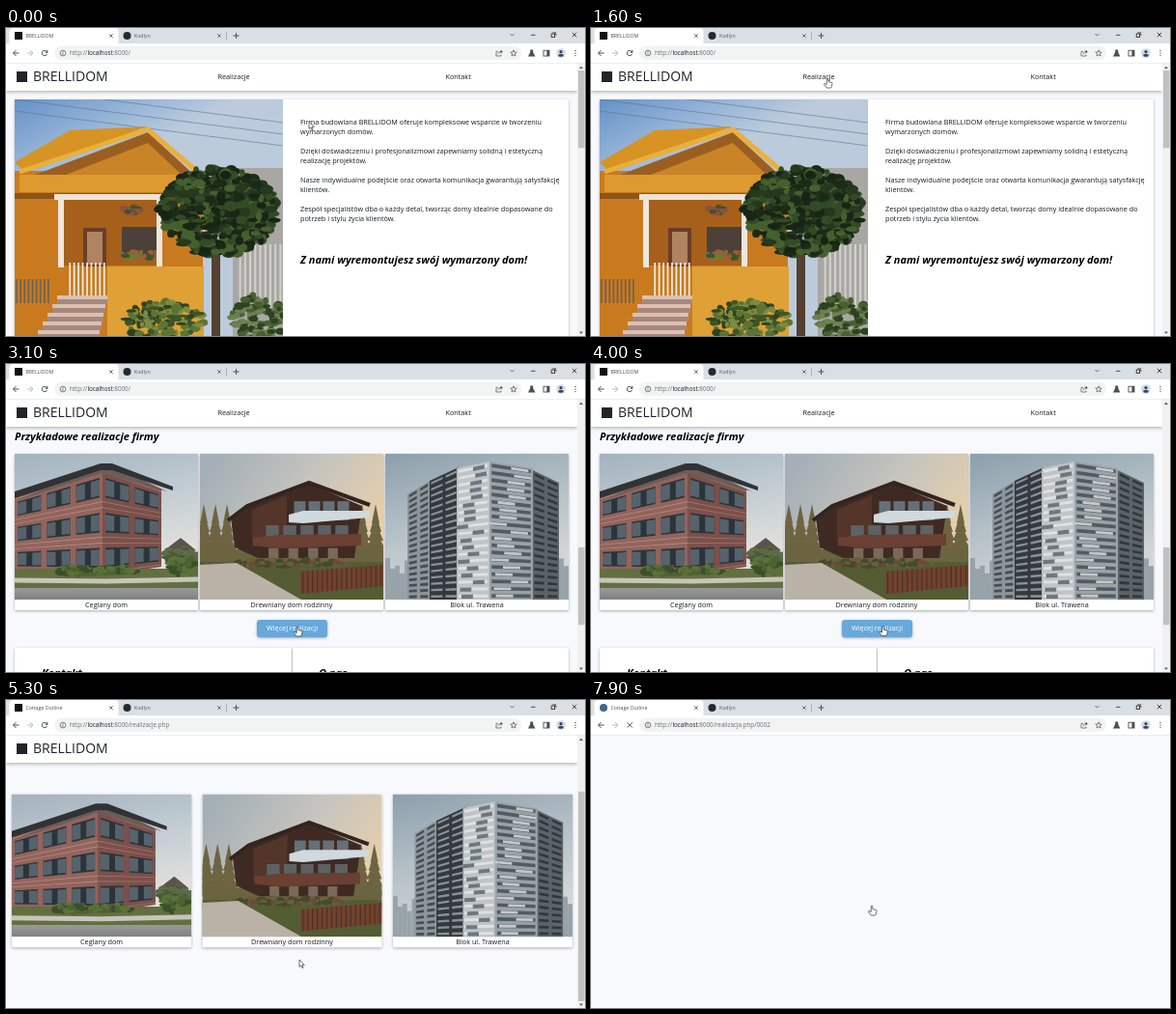
Animation, 600 px wide and 319 px high, one loop 8000 ms. Source, as an HTML page with a canvas:

```html
<!DOCTYPE html>
<html lang="pl">
<head>
<meta charset="utf-8">
<title>BRELLIDOM</title>
<style>
html, body { margin: 0; width: 100%; height: 100%; overflow: hidden; background: #f8f9fc; }
canvas { display: block; width: 600px; height: 319px; }
</style>
</head>
<body>
<canvas id="stage"></canvas>
<script>
const W = 600, H = 319, LOOP = 8000, STEP = 100;
const NAME = 'BRELLIDOM';
const FONT = '"Open Sans", "Noto Sans", sans-serif';
const canvas = document.getElementById('stage');
const c = canvas.getContext('2d');
const dpr = window.devicePixelRatio || 1;
canvas.width = W * dpr;
canvas.height = H * dpr;

const lerp = (a, b, k) => a + (b - a) * k;
const smooth = (a, b, t) => {
  const k = Math.min(1, Math.max(0, (t - a) / (b - a)));
  return k * k * (3 - 2 * k);
};

// ---- drawing helpers ----
function rect(color, x, y, w, h) {
  c.fillStyle = color;
  c.fillRect(x, y, w, h);
}
function trace(p) {
  c.beginPath();
  for (let i = 0; i < p.length; i += 2) c.lineTo(p[i], p[i + 1]);
}
function poly(color, ...p) {
  trace(p);
  c.fillStyle = color;
  c.fill();
}
function line(color, width, ...p) {
  trace(p);
  c.strokeStyle = color;
  c.lineWidth = width;
  c.stroke();
}
function disc(color, x, y, rx, ry = rx) {
  c.fillStyle = color;
  c.beginPath();
  c.ellipse(x, y, rx, ry, 0, 0, 7);
  c.fill();
}
function ring(color, width, x, y, r, a = 0, b = 7) {
  c.strokeStyle = color;
  c.lineWidth = width;
  c.beginPath();
  c.arc(x, y, r, a, b);
  c.stroke();
}
function round(color, x, y, w, h, r) {
  c.fillStyle = color;
  c.beginPath();
  c.roundRect(x, y, w, h, r);
  c.fill();
}
function grad(x0, y0, x1, y1, ...colors) {
  const g = c.createLinearGradient(x0, y0, x1, y1);
  colors.forEach((col, i) => g.addColorStop(i / (colors.length - 1), col));
  return g;
}
function text(s, x, mid, size = 7.25, color = '#17191c', style = '', align = 'left') {
  c.font = `${style} ${size}px ${FONT}`;
  c.fillStyle = color;
  c.textAlign = align;
  c.fillText(s, x, mid + size * 0.34);
}
const title = (s, x, mid) => text(s, x, mid, 11.05, '#000', 'italic bold');
function shadow(alpha, blur, dy) {
  c.shadowColor = `rgba(0,0,0,${alpha})`;
  c.shadowBlur = blur * dpr;
  c.shadowOffsetY = dy * dpr;
}
function card(x, y, w, h, color = '#fff', r = 1) {
  c.save();
  shadow(0.32, 3, 1);
  round(color, x, y, w, h, r);
  c.restore();
}
function clipped(x, y, w, h, draw) {
  c.save();
  c.beginPath();
  c.rect(x, y, w, h);
  c.clip();
  draw();
  c.restore();
}
// Wall in perspective: fills a patch from (u0,v0) to (u1,v1)
function wall(x0, t0, b0, x1, t1, b1) {
  const at = (u, v) => [lerp(x0, x1, u), lerp(lerp(t0, t1, u), lerp(b0, b1, u), v)];
  return (color, u0 = 0, v0 = 0, u1 = 1, v1 = 1) =>
    poly(color, ...at(u0, v0), ...at(u1, v0), ...at(u1, v1), ...at(u0, v1));
}
// Evenly spaced panes; w and h are shares of a cell
function panes(face, cols, rows, w, h, color) {
  for (let i = 0; i < cols; i++)
    for (let j = 0; j < rows; j++)
      face(color, (i + 0.5 - w / 2) / cols, (j + 0.5 - h / 2) / rows,
        (i + 0.5 + w / 2) / cols, (j + 0.5 + h / 2) / rows);
}
function random(seed) {
  return () => (seed = (seed * 16807) % 2147483647) / 2147483647;
}
function leaves(x, y, rx, ry, n, size, ...colors) {
  const r = random(n * 31 + 7);
  for (let i = 0; i < n; i++) {
    const a = r() * 6.283, d = Math.sqrt(r());
    disc(colors[i % colors.length], x + Math.cos(a) * rx * d, y + Math.sin(a) * ry * d,
      size * (0.5 + r()), size * (0.4 + r() * 0.6));
  }
}

// ---- pictures ----
function yellowHouse() {
  rect(grad(9, 74, 60, 170, '#6592c6', '#8fb0d6', '#bccbdc'), 9, 74, 278, 270);
  for (let i = 0; i < 3; i++) line('#5a7494', 0.6, 9, 62 + i * 12, 287, 98 + i * 12);
  rect('#a9a7a3', 235, 145, 52, 200);
  poly('#d79323', 9, 139, 66, 106, 146, 102, 20, 150);
  rect('#c97a1e', 9, 148, 195, 200);
  poly('#9a5f20', 147, 108, 30, 152, 195, 152);
  poly('#c98427', 147, 119, 62, 152, 182, 152);
  line('#eab03c', 5, 14, 149, 147, 105, 202, 152);
  rect('#dd9a2f', 14, 152, 185, 18);
  rect('#8f5319', 9, 171, 190, 6);
  rect('#a6601c', 60, 178, 100, 68);
  rect('#6b3e26', 80, 207, 24, 40);
  rect('#b08460', 84, 211, 16, 34);
  rect('#4b4139', 120, 206, 38, 27);
  leaves(140, 235, 24, 5, 40, 3, '#40532a', '#687b3a', '#a05b37');
  leaves(130, 188, 9, 5, 22, 3, '#40532a', '#8c5140');
  for (const x of [54, 156]) rect('#efe6dc', x, 174, 6, 74);
  rect('#eee4d6', 50, 172, 115, 6);
  rect('#dfa035', 105, 247, 100, 97);
  panes(wall(64, 243, 277, 104, 243, 277), 9, 1, 0.4, 1, '#f1e9df');
  panes(wall(9, 260, 285, 46, 260, 285), 9, 1, 0.4, 1, '#6d6258');
  for (let i = 0; i < 7; i++) {
    rect('#d9c1b5', 53 - i * 5, 277 + i * 9, 52 + i * 3, 4);
    rect('#a98779', 53 - i * 5, 281 + i * 9, 52 + i * 3, 5);
  }
  panes(wall(240, 224, 290, 287, 224, 290), 9, 1, 0.4, 1, '#d2d0ca');
  leaves(165, 304, 42, 22, 160, 4, '#3d5526', '#5c7433', '#7c8a44', '#2f4220');
  leaves(262, 300, 28, 24, 120, 4, '#2c4222', '#486031', '#6d8150');
  rect('#56402f', 213, 225, 9, 110);
  leaves(220, 190, 60, 46, 650, 5, '#1c2a18', '#26381e', '#334b25', '#45602f', '#182414');
}

function apartments() {
  rect('#a89c86', 305, 353, 278, 206);
  const block = (x0, x1) => wall(x0, 375, 531, x1, 375, 531);
  const left = block(305, 338), brick = block(500, 583);
  left('#9a603f');
  panes(left, 2, 6, 0.7, 0.6, '#e6e5dd');
  panes(left, 2, 6, 0.45, 0.4, '#525b5c');
  for (const face of [block(342, 416), block(438, 498)]) {
    face('#50564f');
    panes(face, 4, 6, 0.85, 0.45, '#b9b992');
    panes(face, 2, 6, 0.1, 1, '#d8d6c2');
  }
  brick('#a05e3c');
  panes(brick, 1, 6, 1, 0.2, '#c9c1ae');
  panes(brick, 3, 6, 0.6, 0.6, '#e9e9e4');
  panes(brick, 6, 6, 0.38, 0.44, '#525e63');
  rect('#dfe2de', 505, 505, 28, 4);
  rect('#3c3c37', 507, 509, 24, 24);
  rect(grad(0, 528, 0, 559, '#737b38', '#56662b', '#3c4a1d'), 305, 529, 278, 30);
  for (let i = 0; i < 4; i++) line('#3a461f', 2, 305, 533 + i * 7, 583, 539 + i * 7);
  leaves(400, 528, 95, 4, 110, 3, '#4b5a2b', '#66723b', '#39461f');
  line('#40362b', 1.6, 429, 400, 430, 533);
}

// The next three fill a box of 190 x 151
function brickHouse() {
  rect(grad(0, 0, 30, 130, '#a3b2be', '#bfcad1', '#e0e0dc'), 0, 0, 190, 151);
  poly('#5c5350', 155, 100, 172, 87, 188, 100);
  leaves(172, 106, 18, 8, 60, 4, '#5f6b48', '#4b5a3c');
  const left = wall(0, 45, 122, 91, 16, 126), right = wall(91, 16, 126, 152, 37, 117);
  left('#93645c');
  right('#7c504a');
  for (const [face, cols] of [[left, 3], [right, 2]]) {
    panes(face, 1, 3, 1, 0.86, face === left ? '#b8958c' : '#a17f78');
    panes(face, 1, 3, 1, 0.82, face === left ? '#93645c' : '#7c504a');
    panes(face, cols, 3, 0.8, 0.56, '#2c343b');
    panes(face, cols * 2, 3, 0.6, 0.46, '#56636c');
  }
  poly('#6c5d57', 0, 49, 90, 20, 158, 39, 100, 12, 89, 12);
  poly('#303236', 0, 39, 89, 10, 101, 10, 164, 34, 164, 38, 101, 17, 89, 17, 0, 46);
  rect('#62703f', 0, 119, 190, 20);
  leaves(85, 121, 45, 4, 80, 4, '#4d6331', '#5c7039', '#3b4f29');
  leaves(174, 116, 15, 9, 60, 4, '#4b6330', '#5c7039', '#39502a');
  line('#c8c4bb', 5, 0, 131, 95, 132, 190, 130);
  rect(grad(0, 138, 0, 151, '#999a9b', '#7f8184'), 0, 139, 190, 12);
}

function woodHouse() {
  rect(grad(20, 0, 170, 110, '#a4afb6', '#c6c4be', '#ead0a8'), 0, 0, 190, 151);
  for (const x of [4, 16, 28, 168, 182])
    for (let i = 0; i < 5; i++)
      poly('#6e6442', x, 52 + i * 9, x - 4 - i * 2, 72 + i * 9, x + 4 + i * 2, 72 + i * 9);
  rect('#6b6440', 0, 99, 190, 22);
  poly('#3f2a23', 32, 67, 49, 54, 113, 31, 168, 54, 160, 108, 60, 108, 36, 97);
  poly('#54352a', 54, 58, 90, 43, 90, 88, 54, 92);
  panes(wall(96, 48, 70, 156, 48, 70), 4, 1, 0.8, 0.9, '#667078');
  panes(wall(66, 73, 87, 156, 73, 87), 5, 1, 0.75, 0.85, '#5d6264');
  panes(wall(66, 97, 109, 148, 97, 109), 4, 1, 0.5, 0.9, '#7b6958');
  line('#33241f', 4, 29, 69, 49, 54, 113, 30, 176, 53);
  poly('#cfd9de', 92, 63, 107, 59, 176, 59, 176, 66, 107, 72, 92, 71);
  poly('#694031', 55, 87, 82, 84, 167, 83, 167, 95, 82, 98, 55, 95);
  rect('#545c33', 0, 112, 190, 39);
  leaves(92, 113, 60, 4, 100, 3, '#4a4630', '#62623a', '#6e4936', '#404c2d');
  poly('#bab2a6', 0, 115, 38, 113, 105, 151, 0, 151);
  const fence = wall(104, 122, 145, 190, 115, 137);
  fence('#6f4330');
  panes(fence, 17, 1, 0.25, 1, '#523022');
}

function tower() {
  rect(grad(0, 0, 40, 151, '#8c9fac', '#b3bfc6', '#d6d8d6'), 0, 0, 190, 151);
  const r = random(19);
  for (let x = 0; x < 190; x += 5) rect('#98a3a9', x, 108 + r() * 22, 5, 43);
  const light = wall(23, 42, 151, 46, 28, 151), dark = wall(46, 28, 151, 76, 14, 151);
  const front = wall(74, 15, 151, 108, 8, 151), bands = wall(108, 8, 151, 153, 15, 151);
  const back = wall(153, 17, 151, 180, 30, 151);
  light('#8d959a');
  dark('#33393e');
  front('#bfc4c7');
  bands('#9aa2a7');
  back('#5b6369');
  const floors = 19;
  panes(light, 2, floors, 0.7, 0.45, '#444c52');
  panes(dark, 2, floors, 0.8, 0.35, '#8b9296');
  panes(front, 1, floors, 0.9, 0.4, '#dfe1e1');
  panes(bands, 1, floors, 0.9, 0.5, '#525b62');
  panes(back, 2, floors, 0.75, 0.4, '#30373c');
  for (let i = 0; i < floors; i++) {
    const u = r() * 0.6, v = (i + 0.3) / floors;
    front('#6d777e', u, v, u + 0.35, v + 0.03);
    bands('#c4c9cb', u, v, u + 0.4, v + 0.02);
  }
}

const photos = [brickHouse, woodHouse, tower];
const labels = ['Ceglany dom', 'Drewniany dom rodzinny', 'Blok ul. Trawena'];

function tile(i, x, y, w) {
  const k = w / 190, h = 151 * k;
  card(x, y, w, h + 11);
  c.save();
  c.translate(x, y);
  c.scale(k, k);
  clipped(0, 0, 190, 151, photos[i]);
  c.restore();
  text(labels[i], x + w / 2, y + h + 5.7, 7.25, '#17191c', '', 'center');
}

// ---- pages ----
const about = [
  `Firma budowlana ${NAME} oferuje kompleksowe wsparcie w tworzeniu`, 'wymarzonych domów.',
  'Dzięki doświadczeniu i profesjonalizmowi zapewniamy solidną i estetyczną', 'realizację projektów.',
  'Nasze indywidualne podejście oraz otwarta komunikacja gwarantują satysfakcję', 'klientów.',
  'Zespół specjalistów dba o każdy detal, tworząc domy idealnie dopasowane do', 'potrzeb i stylu życia klientów.'
];
const services = [
  'gazowych i klimatyzacyjnych', 'Zakładanie stolarki budowlanej',
  'Tynkowanie, malowanie i szklenie oraz inne roboty wykończeniowe.',
  'Wykonywanie konstrukcji i pokryć dachowych',
  'Oraz innne roboty budowlane dostosowane do potrzeb klienta'
];

function homePage(scroll) {
  c.save();
  c.translate(0, -scroll);
  card(9, 74, 574, 267);
  clipped(9, 74, 278, 264, yellowHouse);
  about.forEach((s, i) => text(s, 305, 98 + (i >> 1) * 30 + (i % 2) * 10));
  title('Z nami wyremontujesz swój wymarzony dom!', 305, 240);

  card(9, 350, 574, 212);
  clipped(305, 353, 278, 206, apartments);
  text('Wykonywanie instalacji sanitarnych, elektrycznych,', 27, 445);
  services.forEach((s, i) => text(s, 27, 455 + i * 20));

  title('Przykładowe realizacje firmy', 9, 588.5);
  for (let i = 0; i < 3; i++) tile(i, 9 + i * 192, 606, 190);
  card(260, 778, 73, 18, '#68a8da', 3);
  text('Więcej realizacji', 296.5, 787, 7.25, '#fff', '', 'center');
  card(9, 807, 287, 140);
  card(297, 807, 286, 140);
  title('Kontakt', 37, 833);
  title('O nas', 324, 833);
  c.restore();
}

function listPage(scroll, raised) {
  c.save();
  c.translate(0, -scroll);
  title('Wybrane realizacje naszej firmy', 9, 90);
  for (let i = 0; i < 3; i++) tile(i, 6 + i * 197.5, i === 1 && raised ? 161.5 : 163.5, 186);
  c.restore();
}

function siteHeader(withNav) {
  c.save();
  shadow(0.35, 4, 1);
  rect('#fff', 0, 36, 592, 29);
  c.restore();
  rect('#212529', 11, 45, 11, 11);
  text(NAME, 28, 50.5, 14, '#212529');
  if (withNav) {
    text('Realizacje', 219.5, 50.5);
    text('Kontakt', 455.5, 50.5);
  }
}

// Thumb size and place follow from the height of the page
function scrollbar(scroll, pageHeight) {
  const track = 268, k = track / pageHeight;
  rect('#f1f1f1', 592, 36, 8, 283);
  rect('#c1c1c1', 593, 44 + scroll * k, 6.5, 282 * k);
  poly('#606060', 594, 42, 596, 39.5, 598, 42);
  poly('#606060', 594, 314.5, 596, 317, 598, 314.5);
}

// ---- browser frame ----
const INK = '#4b4f54';

function cross(x, y, r, color = INK, w = 0.8) {
  line(color, w, x - r, y - r, x + r, y + r);
  line(color, w, x - r, y + r, x + r, y - r);
}
function arrow(x, dir, color) {
  line(color, 1, x - 3, 26, x + 3, 26);
  line(color, 1, x, 23, x + 3 * dir, 26, x, 29);
}

function tabStrip(tab, loading) {
  rect('#dadfe3', 0, 0, W, 17);
  round('#fff', 3.5, 0, 113, 18, [4, 4, 0, 0]);
  if (loading) disc('#41658c', 13, 8, 4);
  else rect('#111', 9, 4, 8, 8);
  text(tab, 20.5, 8, 5.2, '#45494d');
  disc('#24292f', 125.5, 8, 4);
  text('Kodlyn', 133, 8, 5.2, '#55595e');
  for (const x of [109, 221]) cross(x, 8, 1.7);
  rect('#8d9297', 228, 4, 0.6, 8);
  line(INK, 1, 235.5, 8, 241.5, 8);
  line(INK, 1, 238.5, 5, 238.5, 11);
  line(INK, 0.8, 522.5, 6, 524.5, 8, 526.5, 6);
  line('#222', 0.8, 544, 7.3, 548.5, 7.3);
  c.strokeRect(565.2, 6, 3.4, 3.4);
  line('#222', 0.7, 566.4, 4.8, 569.8, 4.8, 569.8, 8.2);
  cross(589, 7, 2.2, '#222');
}

function addressBar(path, loading) {
  rect('#fff', 0, 16, W, 20);
  rect('#e3e5e8', 0, 36, W, 0.6);
  arrow(10.5, -1, INK);
  arrow(25, 1, '#b9bcc0');
  if (loading) cross(40.3, 26, 2.6, INK, 1);
  else {
    ring(INK, 1, 40, 26, 2.7, 0.3, 5.4);
    poly(INK, 43.3, 22.6, 43.3, 25.7, 40.2, 25.7);
  }
  round('#f1f3f4', 50, 18.8, 484, 14.4, 7.2);
  ring(INK, 0.7, 59, 26, 2.9);
  rect(INK, 58.6, 25.5, 0.8, 2.2);
  rect(INK, 58.6, 24, 0.8, 0.8);
  let x = 66;
  for (const [s, color] of [['http://', '#6a6e73'], ['localhost', '#1c1e21'], [':8000/' + path, '#6a6e73']]) {
    text(s, x, 26, 6.27, color);
    x += c.measureText(s).width;
  }
  line(INK, 0.7, 510, 24.3, 508, 24.3, 508, 29, 513, 29, 513, 27.5);
  line(INK, 0.7, 510, 27, 511, 25, 514, 24.6);
  poly(INK, 512.6, 22.6, 514.8, 24.6, 512.6, 26.6);
  const star = [];
  for (let i = 0; i <= 10; i++) {
    const r = i % 2 ? 1.5 : 3.4, a = i * Math.PI / 5 - Math.PI / 2;
    star.push(526 + r * Math.cos(a), 26.2 + r * Math.sin(a));
  }
  line(INK, 0.7, ...star);
  poly(INK, 543.2, 22.5, 546.2, 22.5, 546.2, 25, 548.4, 29.4, 541, 29.4, 543.2, 25);
  c.lineWidth = 0.9;
  c.strokeRect(557, 23.2, 6, 5.8);
  rect(INK, 560.4, 23, 2.6, 6);
  disc('#cfdbea', 575, 26, 4.8);
  disc('#35455c', 575, 24.6, 1.6);
  disc('#35455c', 575, 28.3, 2.8, 1.5);
  for (const y of [23.4, 26, 28.6]) disc(INK, 590, y, 0.7);
}

function browser(tab, path, loading = false) {
  tabStrip(tab, loading);
  addressBar(path, loading);
}

// ---- pointer ----
// Arrival time and place; each move takes at most MOVE ms
const MOVE = 800;
const stops = [[0, 314, 97], [900, 272, 42], [1200, 245, 52], [3000, 302, 272],
  [4600, 304, 269], [6300, 284, 242], [7200, 291, 213]];

function pointerAt(t) {
  let [last, x, y] = stops[0];
  for (const [time, px, py] of stops) {
    const k = smooth(Math.max(last, time - MOVE) - 1, time, t);
    x = lerp(x, px, k);
    y = lerp(y, py, k);
    last = time;
  }
  return { x, y };
}

function pointer(p, hand) {
  c.save();
  c.translate(p.x, p.y);
  c.lineJoin = 'round';
  const shape = hand
    ? [-0.7, 0.3, 0.7, 0.3, 0.9, 3.6, 4.6, 4.5, 5, 5.5, 4.4, 8.2, 3.6, 10, -0.8, 10, -3.6, 6.4, -3, 5.4, -0.8, 6.6, -0.7, 0.3]
    : [0, 0, 0, 7.4, 1.7, 5.9, 2.9, 8.7, 4.1, 8.2, 2.9, 5.5, 5.2, 5.4, 0, 0];
  poly('#fff', ...shape);
  line('#333', 0.7, ...shape);
  c.restore();
}

function draw(now) {
  const t = Math.floor(now % LOOP / STEP) * STEP;
  const p = pointerAt(t);
  let hand = true;
  c.setTransform(dpr, 0, 0, dpr, 0, 0);
  rect('#f8f9fc', 0, 0, W, H);
  if (t < 4100) {
    const scroll = 513 * smooth(1624, 2176, t);
    const onLink = p.y < 58 && Math.abs(p.x - 236) < 18;
    hand = onLink || p.y + scroll > 778;
    homePage(scroll);
    siteHeader(true);
    scrollbar(scroll, 942);
    browser(NAME, '');
  } else if (t < 7600) {
    const scroll = 66 * smooth(4800, 5200, t);
    hand = p.y + scroll < 322;
    listPage(scroll, hand);
    siteHeader(false);
    scrollbar(scroll, 348);
    browser('Cottage Outline', 'realizacje.php');
  } else {
    browser('Cottage Outline', 'realizacja.php/0002', true);
  }
  pointer(p, hand);
  requestAnimationFrame(draw);
}
requestAnimationFrame(draw);
</script>
</body>
</html>
```
